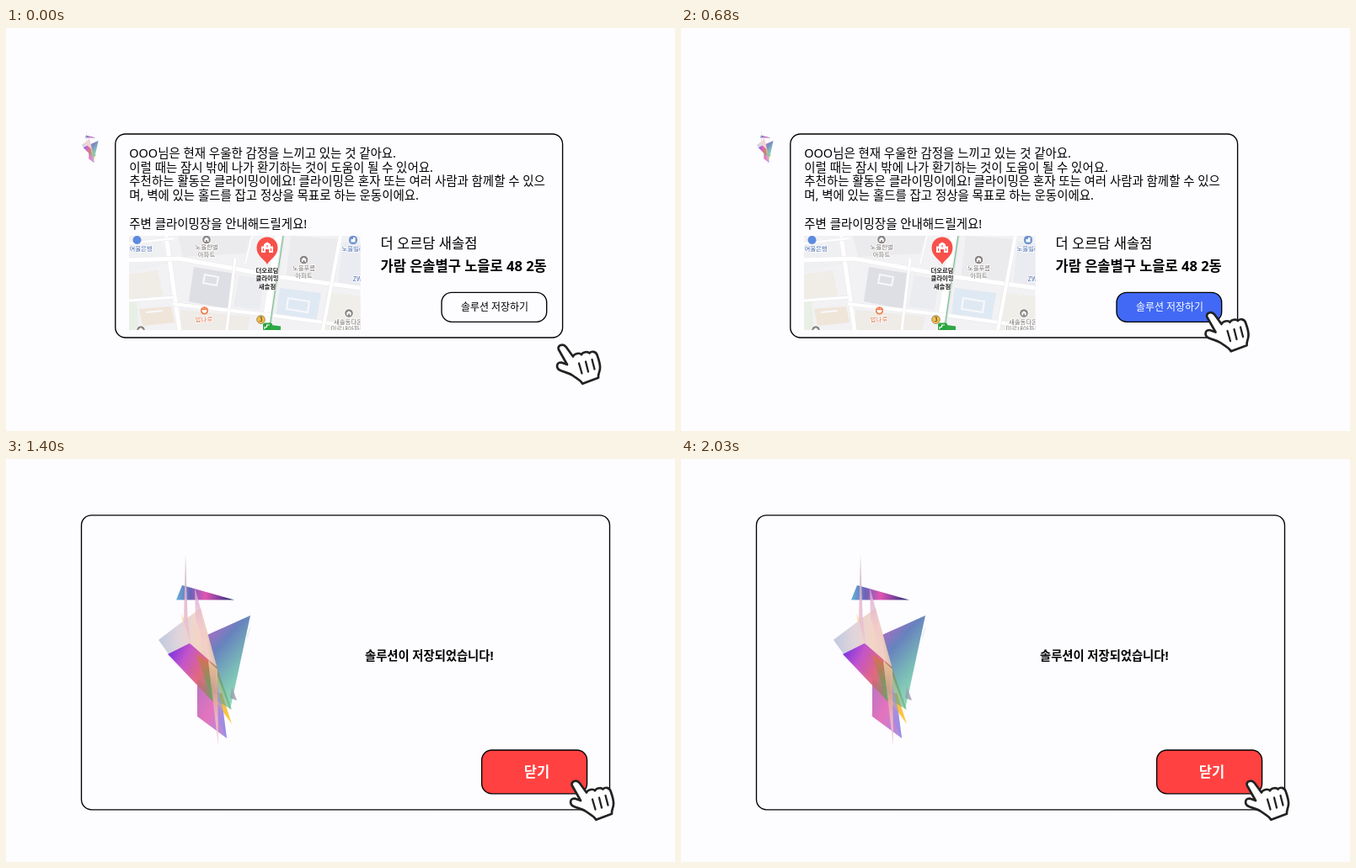
Animation, 794 px wide and 479 px high, one loop 2060 ms. Source, as an HTML page:

```html
<!DOCTYPE html>
<html lang="ko">
<head>
<meta charset="utf-8">
<title>솔루션 저장</title>
<style>
html, body { margin: 0; width: 100%; height: 100%; overflow: hidden; background: #fdfcff; }
svg { display: block; width: 794px; height: 479px; }
text { font-family: 'Noto Sans', 'Noto Sans CJK KR', sans-serif; white-space: pre; }
.box { fill: #fdfcff; stroke: #000; stroke-width: 1.35; }
.body { font-size: 14.46px; }
.big { font-size: 16.5px; }
.bold { font-weight: 700; }
.mid { text-anchor: middle; }
.map text { font-family: 'Noto Sans CJK KR', sans-serif; font-size: 7.4px; font-weight: 500; text-anchor: middle;
  paint-order: stroke; stroke: #fff; stroke-width: 1.6px; stroke-linejoin: round; }
.map .plain { stroke: none; }
.map .bold { font-weight: 700; }
</style>
</head>
<body>
<svg viewBox="0 0 794 479" xmlns="http://www.w3.org/2000/svg">
  <defs>
    <clipPath id="mapClip"><rect x="146" y="247" width="274.5" height="112"/></clipPath>
    <g id="gem"></g>
    <g id="apt">
      <circle r="5.3" fill="#8b8685" stroke="#fff"/>
      <path d="M-2.6 2.4V-.8L0-2.8 2.6-.8V2.4H.9V.4H-.9V2.4Z" fill="#fff"/>
    </g>
  </defs>

  <g id="ask">
    <use href="#gem" transform="translate(57.4 100.4) scale(.18)" opacity=".9"/>
    <rect class="box" x="129.8" y="126" width="530.8" height="242" rx="12"/>
    <g id="lines" class="body"></g>

    <g class="map" clip-path="url(#mapClip)">
      <rect x="146" y="247" width="275" height="112" fill="#f2f1f3"/>
      <g id="blocks"></g>
      <g id="roads" fill="none" stroke="#fff"></g>
      <path d="M329.5 247L313 359" stroke="#dfe3e2" stroke-width="2.6"/>
      <path d="M329 247L312.5 359" stroke="#6cc08a" stroke-width="1"/>
      <circle cx="155.5" cy="252" r="5" fill="#5c8ae0"/>
      <use href="#apt" x="238" y="251.5"/>
      <use href="#apt" x="353.5" y="275.5"/>
      <use href="#apt" x="407" y="339"/>
      <use href="#apt" x="160" y="359"/>
      <rect x="407" y="247" width="10" height="10" rx="4.5" fill="#6f93cf"/>
      <path d="M409.5 254.5V251H412V249H414.5V254.5Z" fill="#fff"/>
      <circle cx="235.5" cy="336" r="5.2" fill="#ef7d4e" stroke="#fff"/>
      <path d="M232.7 335.5H238.3Q238 338.6 235.5 338.6T232.7 335.5ZM234 334V332.6M236.8 334V332.6" fill="#fff" stroke="#fff" stroke-width=".7"/>
      <rect x="305" y="350.5" width="11" height="9" rx="2" fill="#27a53c"/>
      <path d="M307 358V355.5H309.5V353H313" fill="none" stroke="#fff" stroke-width="1.2"/>
      <path d="M315 353L326 354.5V359H314Z" fill="#2fa846"/>
      <circle cx="302.5" cy="346.5" r="4.8" fill="#f5c04c" stroke="#8a7340" stroke-width=".8"/>
      <path d="M310 281C307 275 297.5 271.5 297.5 261A12.5 12.5 0 0 1 322.5 261C322.5 271.5 313 275 310 281Z" fill="#f8504a"/>
      <path d="M303 267V259.5H306V257L310 254.5 314 257V259.5H317V267H312V263H308V267Z" fill="#fff"/>
      <path d="M305.5 262V265M314.5 262V265M310 258V260.5" stroke="#f8504a" stroke-width="1.2"/>
      <g id="labels"></g>
    </g>

    <text class="big" x="444.5" y="262">더 오르담 새솔점</text>
    <text class="big bold" x="444.5" y="289">가람 은솔별구 노을로 48 2동</text>
    <rect id="save" class="box" x="517" y="314.3" width="124.7" height="35" rx="12"/>
    <text id="saveText" class="mid" x="580" y="336.4" font-size="11.95">솔루션 저장하기</text>
  </g>

  <g id="done">
    <rect class="box" x="89.5" y="66.8" width="627" height="350" rx="12"/>
    <use href="#gem"/>
    <text class="bold" x="426" y="239" font-size="14.3">솔루션이 저장되었습니다!</text>
    <rect id="close" class="box" x="564.6" y="346" width="125" height="51.8" rx="12"/>
    <text id="closeText" class="big bold mid" x="630" y="378.3">닫기</text>
  </g>

  <g id="hand" stroke="#222" stroke-width="2.7" stroke-linecap="round" stroke-linejoin="round">
    <path fill="#fff" d="M655.8 382C654 377.5 661 374.5 664.5 378.8L673 390.5C674 387 681 385.5 683 388.2
      C684.5 385 690.5 384 692.5 386.5C695 383.5 700 384.5 701.5 388.5C703 393 705.5 399 705 404.5
      C704.7 409 702.5 411 703 415.8L684.3 422.8C681.5 418 677 416.5 672.5 413
      C667.5 409.5 662 409 657.5 406.8C652.5 404 653 397.5 659 397.5L666 400Z"/>
    <path fill="none" stroke-width="2.3" d="M680 398.5L683.5 410.5M688 396.5L691 408.5M695.5 394L698.5 405.5"/>
  </g>
</svg>

<script>
const $ = id => document.getElementById(id);
const LOOP = 2060, HOVER = 430, SAVED = 824, CLOSE = 1240;

let defs = '', shards = '';
// One gradient-filled polygon; dir = x1,y1,x2,y2 of the gradient inside its own box.
function shard(points, colors, dir, alpha = 1) {
  const id = 'g' + shards.length, [x1, y1, x2, y2] = dir;
  const stops = colors.map((c, i) => `<stop offset="${i / (colors.length - 1)}" stop-color="${c}"/>`).join('');
  defs += `<linearGradient id="${id}" x1="${x1}" y1="${y1}" x2="${x2}" y2="${y2}">${stops}</linearGradient>`;
  shards += `<polygon points="${points}" fill="url(#${id})" opacity="${alpha}"/>`;
}
const DOWN = [0, 0, 0, 1], RIGHT = [0, 0, 1, 0], DIAG = [0, 0, 1, 1];
shard('208,184 214,196 211,198', ['#ffd97a', '#f6dca8'], DOWN);
shard('209,150 271,167.5 202,167.5', ['#62b4d8', '#6d62b8', '#e254b2', '#7a3f9c', '#172b66'], RIGHT);
shard('290,186 239,209 246,245 266,298', ['#c05cc4', '#5f7cba', '#74b8b4', '#8fe3b4'], [.1, 0, .6, 1], .95);
shard('291,198 284,212 287,214', ['#d9d9e6', '#e8f0ee'], DOWN, .6);
shard('268,270 274,287 266,284', ['#a3a5b8', '#8d9aa4'], DOWN, .8);
shard('227,258 227,306 262,332 255,280', ['#b06cc0', '#e36cba', '#9d8fe6'], DIAG, .95);
shard('244,282 256,278 268,315', ['#f0b04a', '#ffcf3e'], DOWN);
shard('231,177 181,215 193,232 240,272 250,246', ['#bcc6dd', '#dcd2da', '#f3d3c4', '#e8c4b8'], RIGHT, .95);
shard('192,232 218,219 250,247 246,289', ['#6a22e2', '#c04ac8', '#e05f78', '#7d9466'], [0, .1, 1, .7], .92);
shard('226,232 250,247 268,298 244,284', ['#e0703c', '#6e9a58', '#66b088'], DOWN, .65);
shard('213,113 215.5,185 219,222 211,192', ['#b9bcc8', '#e3b4cc', '#f0c6d4'], DOWN, .85);
shard('224,152 231,178 243,246 225,190', ['#d4a8d8', '#f2c8cc', '#f4d6c8'], DOWN, .8);
shard('240,240 251,250 252,342 246,290', ['#f0cfa8', '#d9a090', '#f2bcc4', '#f0d0d0'], DOWN, .85);
shard('251,268 258,300 262,332 252,310', ['#a09ae8', '#8f8ae4'], DOWN, .7);
document.querySelector('defs').insertAdjacentHTML('beforeend', defs);
$('gem').innerHTML = shards;

$('lines').innerHTML = [
  'OOO님은 현재 우울한 감정을 느끼고 있는 것 같아요.',
  '이럴 때는 잠시 밖에 나가 환기하는 것이 도움이 될 수 있어요.',
  '추천하는 활동은 클라이밍이에요! 클라이밍은 혼자 또는 여러 사람과 함께할 수 있으',
  '며, 벽에 있는 홀드를 잡고 정상을 목표로 하는 운동이에요.',
  '',
  '주변 클라이밍장을 안내해드릴게요!'
].map((s, i) => `<text x="146.3" y="${154 + i * 16.7}">${s}</text>`).join('');

$('blocks').innerHTML = [
  ['#eef0f2', '146,262 184,253 192,280 146,290'],
  ['#f0ece6', '146,293 180,288 186,318 146,322'],
  ['#efe5d9', '158,334 196,331 200,350 162,354'],
  ['#e8f0e5', '146,325 155,324 158,359 146,359'],
  ['#ebeaed', '204,247 290,247 284,268 210,272'],
  ['#dedee5', '223,284 272,292 264,334 217,325'],
  ['#eaecf0', '277,294 306,299 301,335 270,331'],
  ['#efebe7', '208,335 290,343 286,359 206,359'],
  ['#ebeaec', '338,247 396,251 390,304 332,299'],
  ['#dfe9f4', '325,309 374,315 368,350 320,345'],
  ['#f0eee9', '380,314 421,319 421,359 376,359'],
  ['#eaecf2', '400,254 421,256 421,307 394,304']
].map(([c, p]) => `<polygon points="${p}" fill="${c}"/>`).join('') +
  '<path d="M236 293L252 296 250 306 234 303ZM335 321L360 325 358 338 333 334ZM166 338L186 336" fill="none" stroke="#f8f8fa" stroke-width="2"/>';

$('roads').innerHTML = [
  [8, 'M323 247L307 359'], [5, 'M190 247L206 359'], [5, 'M146 276L205 274 326 296 421 309'],
  [4, 'M198 328L312 341 421 356'], [3, 'M146 324L200 320'], [3, 'M272 274L262 359'],
  [4, 'M397 247L376 359'], [2.5, 'M146 256L200 250'], [2, 'M292 247L284 280']
].map(([w, d]) => `<path d="${d}" stroke="#e9e8eb" stroke-width="${w + 1}"/><path d="${d}" stroke-width="${w}"/>`).join('');

const GRAY = '#77716f', BLUE = '#4468ad';
const label = (s, x, y, color, cls = '') => `<text class="${cls}" x="${x}" y="${y}" fill="${color}">${s}</text>`;
$('labels').innerHTML = [
  ['여울은행', 160, 264.5, BLUE], ['노을한별', 238, 263, GRAY], ['아파트', 238, 272, GRAY],
  ['노을푸름', 353.5, 288, GRAY], ['아파트', 353.5, 297, GRAY], ['노을빌라', 412, 264.5, BLUE],
  ['ZW', 417, 301, BLUE], ['밥나루', 235, 348.5, '#dd7146'],
  ['새솔동다온', 406, 351.5, GRAY], ['미르내아파트', 406, 359.5, GRAY], ['3', 302.5, 349, '#333', 'plain']
].map(a => label(...a)).join('') +
  ['더오르담', '클라이밍', '새솔점'].map((s, i) => label(s, 310, 290.5 + i * 9.6, '#222', 'bold')).join('');

const show = (el, on) => el.setAttribute('visibility', on ? 'visible' : 'hidden');
function press(name, on, color) {
  $(name).style.fill = on ? color : '#fdfcff';
  $(name + 'Text').style.fill = on ? '#fff' : '#000';
}

function draw(now) {
  const t = now % LOOP, saved = t >= SAVED;
  const hover = t >= HOVER, closing = t >= CLOSE;
  show($('ask'), !saved);
  show($('done'), saved);
  show($('hand'), !saved || closing);
  press('save', hover, '#4169f5');
  press('close', closing, '#ff4141');
  $('hand').setAttribute('transform', closing ? 'translate(16 6)' : hover ? 'translate(-31.5 -38.5)' : '');
}

const start = performance.now();
function tick() {
  draw(performance.now() - start);
  requestAnimationFrame(tick);
}
tick();
</script>
</body>
</html>
```
